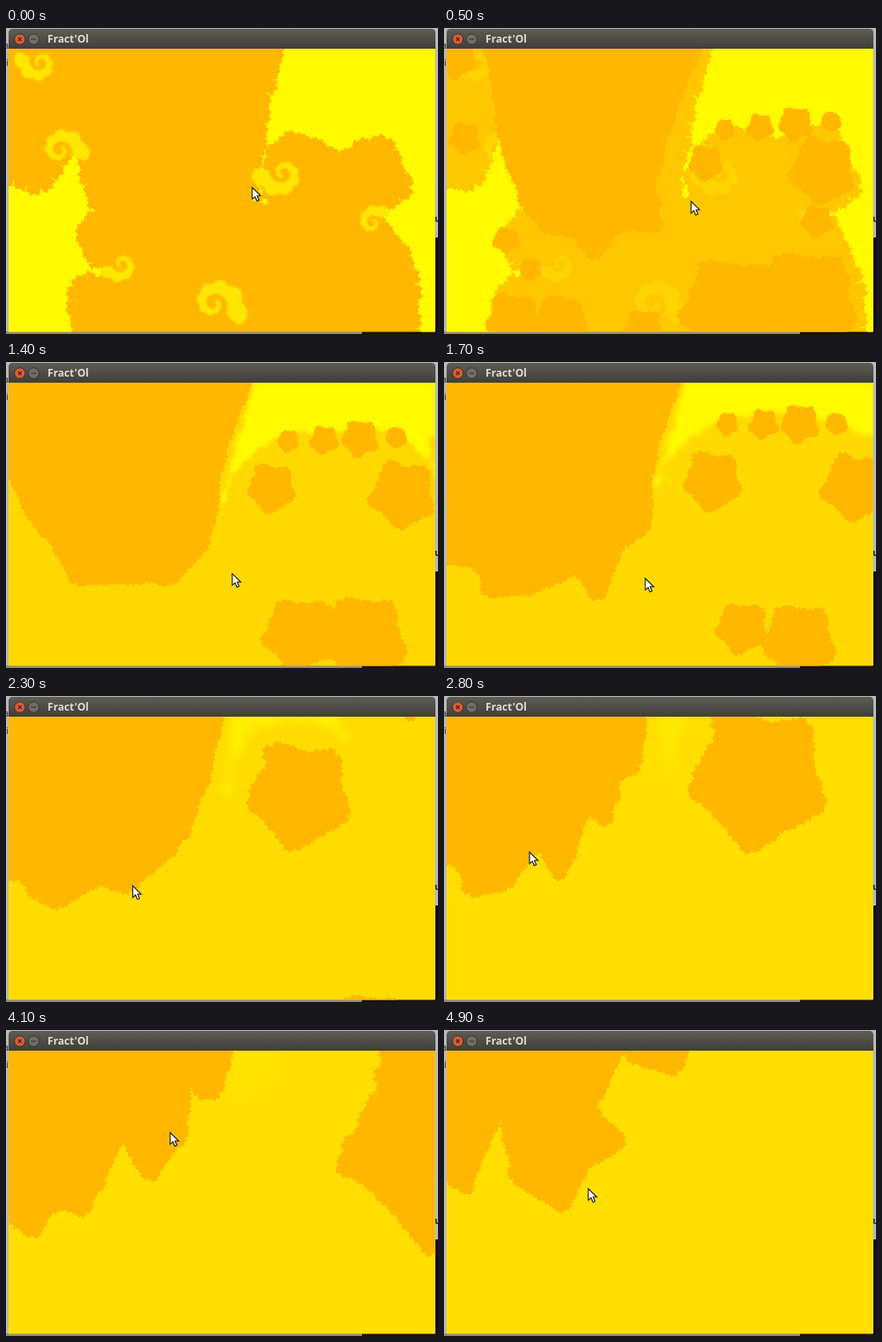
An HTML page that plays this animation: 500 px wide and 355 px high, repeating every 5000 ms.

```html
<!DOCTYPE html>
<html lang="en">
<head>
<meta charset="utf-8">
<title>Fract'Ol</title>
<style>
html, body { margin: 0; width: 100%; height: 100%; overflow: hidden; background: #b9b9b9; }
svg { display: block; width: 500px; height: 355px; }
text { font-family: "Open Sans", "Noto Sans", sans-serif; }
</style>
</head>
<body>
<svg viewBox="0 0 500 355" xmlns="http://www.w3.org/2000/svg">
  <defs>
    <linearGradient id="bar" x2="0" y2="1">
      <stop offset="0" stop-color="#5d5c56"/><stop offset="1" stop-color="#3f3e3a"/>
    </linearGradient>
    <filter id="soft" x="0" y="0" width="500" height="355" filterUnits="userSpaceOnUse">
      <feGaussianBlur id="blur" stdDeviation="1"/>
    </filter>
    <filter id="haze"><feGaussianBlur stdDeviation="1.2"/></filter>
    <clipPath id="view"><rect x="3" y="24" width="493.5" height="328.5"/></clipPath>
  </defs>

  <!-- desktop behind the window -->
  <rect width="500" height="355" fill="#b9b9b9"/>
  <rect y="352" width="412" height="3" fill="#8f8a80"/>
  <rect x="497" y="243" width="3" height="112" fill="#15080f"/>
  <rect x="412" y="352" width="88" height="3" fill="#1c1210"/>
  <text x="-3" y="24" font-size="11" fill="#222">a</text>
  <text x="0" y="44" font-size="11" fill="#333">i</text>
  <text x="496" y="225" font-size="11" font-weight="700" fill="#222">u</text>

  <!-- title bar -->
  <path d="M3 24V6Q3 1 8 1H492Q497 1 497 6V24Z" fill="url(#bar)"/>
  <circle cx="16" cy="13" r="6.2" fill="#de5d36" stroke="#34332f"/>
  <path d="M14 11L18 15M18 11L14 15" stroke="#4a2318" stroke-width="1.2"/>
  <circle cx="32" cy="13" r="6.2" fill="#706e67" stroke="#34332f"/>
  <path d="M29 13H35" stroke="#3a3935" stroke-width="1.2"/>
  <text x="48" y="17" font-size="12.2" font-weight="700" fill="#dfdbd2">Fract'Ol</text>

  <g clip-path="url(#view)">
    <rect id="ground" x="3" y="24" width="494" height="329"/>
    <g id="yellow" fill="#fffa00" filter="url(#soft)"></g>
    <g id="arms" fill="#ffe600" filter="url(#haze)"></g>
    <g id="orange" fill="#ffb700"></g>
  </g>
  <path id="cursor" d="M0 0V13.6L3.2 10.7 5.4 15.8 7.8 14.7 5.7 9.8H9.8Z" fill="#fff" stroke="#111" stroke-width="1.1"/>
</svg>
<script>
const LOOP = 5000, STEP = 100, TAU = 2 * Math.PI;
const keys = [0, 1000, 1700, 2800, 3500, 4100, 4900];
const pointer = [[285, 185], [281, 221], [233, 251], [99, 181], [232, 87], [190, 119], [167, 184]];

const el = id => document.getElementById(id);
const clamp = (v, a, b) => Math.min(b, Math.max(a, v));
const mix = (a, b, f) => a + (b - a) * f;
const mixAll = (a, b, f) => a.map((v, n) => mix(v, b[n], f));
const ease = (t, from, to) => clamp((t - from) / (to - from), 0, 1);
const noise = n => {
  const s = Math.sin(n * 12.9898) * 43758.5453;
  return s - Math.floor(s);
};
const poly = s => s.split(' ').map(p => p.split(',').map(Number));
// The view zooms in, so small islands drift away from its middle.
const drift = ([x, y, r]) => [[x, y, r], [250 + 2.2 * (x - 250), 150 + 2.2 * (y - 150), r * 1.5]];

// Coasts are anchor points; islands are [x, y, radius]. "from" is the first key pose.
const yellowShapes = [
  { from: 0, tuft: 9, poses: [
    poly('322,10 300,75 284,200 302,205 303,150 335,124 385,148 440,130 466,184 425,215 466,265 472,315 472,365 520,365 520,-10'),
    poly('300,10 272,80 256,150 258,190 282,150 322,108 385,118 455,100 490,182 460,215 470,260 490,310 490,365 520,365 520,-10'),
    poly('278,10 255,80 240,140 245,145 270,115 310,75 385,62 440,75 520,100 520,-10'),
    poly('240,10 245,70 262,92 275,70 290,10'),
    poly('240,10 225,60 270,95 320,60 340,10')] },
  { from: 0, tuft: 9, poses: [
    poly('-20,365 80,365 78,300 112,285 84,240 104,212 92,165 82,130 40,186 -20,165'),
    poly('-20,365 48,365 48,325 70,285 50,245 90,210 68,130 46,90 30,175 -20,185'),
    poly('-120,365 -120,165')] }
];

const mainMass = { from: 1, tuft: 7, poses: [
  poly('300,10 262,100 240,185 250,232 205,228 175,266 150,236 122,236 95,205 72,140 48,10 -200,-20'),
  poly('275,10 240,105 234,196 205,208 178,274 152,240 105,264 50,270 46,240 14,230 -20,232 -200,-20'),
  poly('232,10 224,80 200,95 190,148 166,130 136,212 110,172 72,220 30,228 16,192 -20,188 -200,-20'),
  poly('242,10 238,66 210,70 207,32 204,104 176,136 155,98 126,166 92,188 74,152 14,184 -200,-20'),
  poly('262,10 246,72 222,76 210,34 204,124 166,172 134,122 92,212 60,200 30,238 6,215 -200,-20'),
  poly('285,10 270,46 235,42 204,20 170,92 208,128 162,160 140,208 82,172 68,80 26,190 -200,-20')] };

const island = (...poses) => ({ from: 1, poses });
const orangeShapes = [
  mainMass,
  island([303, 157, 20], [311, 138, 34], [365, 95, 82], [452, 108, 118], [508, 130, 125], [650, 100, 125]),
  island([438, 165, 38], [475, 145, 38], [620, 110, 60]),
  island([335, 325, 60], [345, 308, 30], [340, 450, 40]),
  island([420, 318, 58], [412, 324, 42], [430, 450, 50])
];
for (let i = 0; i < 4; i++) {
  const r = 12 + 5 * (i % 3);
  orangeShapes.push(island([325 + 41 * i, 118 - 3 * i, r * .9], [328 + 42 * i, 72, r], [400 + 60 * i, -50, r]));
}
for (const p of [[432, 224, 19], [72, 246, 15], [100, 280, 12], [80, 340, 32], [135, 340, 30], [230, 348, 22], [24, 128, 18], [14, 34, 24]])
  orangeShapes.push(island(...drift(p)));

// Spiral bays: centre, radius, angle where the arm enters.
const spirals = [[321, 168, 33, 3.3], [62, 142, 32, .4], [240, 320, 38, .7], [134, 274, 24, 3], [424, 226, 22, -.5], [40, 40, 28, 3.6]];

const add = (parent, d = '') => {
  const node = document.createElementNS('http://www.w3.org/2000/svg', 'path');
  node.setAttribute('d', d);
  return parent.appendChild(node);
};
const path = list => 'M' + list.map(p => p[0].toFixed(1) + ' ' + p[1].toFixed(1)).join('L') + 'Z';

// A tapering arm that winds into its centre, with a scalloped outer side.
function arm([x, y, r, start]) {
  const outer = [], inner = [];
  for (let a = 0; a < 8; a += .08) {
    const R = r * Math.exp(-a * .23), at = start - a;
    const lobe = 1 + .2 * Math.abs(Math.sin(a * 4));
    outer.push([x + R * lobe * Math.cos(at), y + R * lobe * Math.sin(at)]);
    inner.unshift([x + R * .5 * Math.cos(at), y + R * .5 * Math.sin(at)]);
  }
  return path([...outer, ...inner]);
}

// Every edge grows a row of little bushes, each with smaller spikes.
function coast(line, tuft, seed) {
  const out = [];
  line.forEach((a, i) => {
    const b = line[(i + 1) % line.length];
    const dx = b[0] - a[0], dy = b[1] - a[1], len = Math.hypot(dx, dy);
    if (len < 1) return;
    const bushes = Math.max(1, Math.round(len / tuft / 1.9)), steps = bushes * 14;
    for (let n = 0; n < steps; n++) {
      const t = n / steps, j = Math.floor(n / 14), u = n / 14 - j;
      const grow = tuft * (.55 + .75 * noise(seed + i * 31 + j));
      const spike = n % 3 === 1 ? .32 : 0;
      const h = grow * (Math.sqrt(Math.sin(Math.PI * u)) * .8 + spike * Math.sin(Math.PI * u));
      const lean = grow * .4 * Math.sin(TAU * u) * -1;
      out.push([a[0] + dx * t + (dy * h + dx * lean) / len, a[1] + dy * t + (dy * lean - dx * h) / len]);
    }
  });
  return path(out);
}

function ring([x, y, r], seed) {
  return Array.from({ length: 15 }, (_, n) => {
    const a = n * TAU / 15;
    const R = r * (.85 + .17 * Math.cos(5 * a - 8.5) + .1 * (noise(seed + n) - .5));
    return [x + R * Math.cos(a), y + R * Math.sin(a)];
  });
}

function outline(s, i, f) {
  const pose = n => s.poses[clamp(n - s.from, 0, s.poses.length - 1)];
  const a = pose(i), b = pose(i + 1);
  if (!s.tuft) {
    const spot = mixAll(a, b, f);
    return coast(ring(spot, s.seed), clamp(spot[2] * .16, 3, 9), s.seed);
  }
  const at = (list, n) => list[Math.min(n, list.length - 1)];
  const size = Math.max(a.length, b.length);
  return coast(Array.from({ length: size }, (_, n) => mixAll(at(a, n), at(b, n), f)), s.tuft, s.seed);
}

function spline(list, i, f, axis) {
  const v = n => list[clamp(n, 0, list.length - 1)][axis];
  const a = v(i - 1), b = v(i), c = v(i + 1), d = v(i + 2);
  return b + f / 2 * (c - a + f * (2 * a - 5 * b + 4 * c - d + f * (3 * (b - c) + d - a)));
}

const shapes = [...yellowShapes, ...orangeShapes];
shapes.forEach((s, n) => {
  s.seed = 7 + n * 113;
  s.node = add(el(n < yellowShapes.length ? 'yellow' : 'orange'));
});
spirals.forEach(s => add(el('arms'), arm(s)));

function draw(t) {
  let i = 0;
  while (i < keys.length - 2 && t >= keys[i + 1]) i++;
  const f = (t - keys[i]) / (keys[i + 1] - keys[i]);
  const green = mix(183, 214, ease(t, 0, 1000)) + 8 * ease(t, 1000, 2800);

  el('ground').setAttribute('fill', `rgb(255,${Math.round(green)},0)`);
  el('yellow').setAttribute('opacity', 1 - .6 * ease(t, 1700, 2800) - .4 * ease(t, 2800, 4900));
  el('blur').setAttribute('stdDeviation', .5 + 2 * ease(t, 1000, 1700) + 6 * ease(t, 1700, 3500));
  el('arms').setAttribute('opacity', 1 - ease(t, 0, 900));
  el('orange').setAttribute('opacity', ease(t, 0, 500));
  for (const s of shapes) s.node.setAttribute('d', outline(s, i, f));
  el('cursor').setAttribute('transform', `translate(${spline(pointer, i, f, 0)} ${spline(pointer, i, f, 1)})`);
}

let shown = -1;
function tick() {
  const t = Math.floor(performance.now() % LOOP / STEP) * STEP;
  if (t !== shown) draw(shown = t);
  requestAnimationFrame(tick);
}
tick();
</script>
</body>
</html>
```
